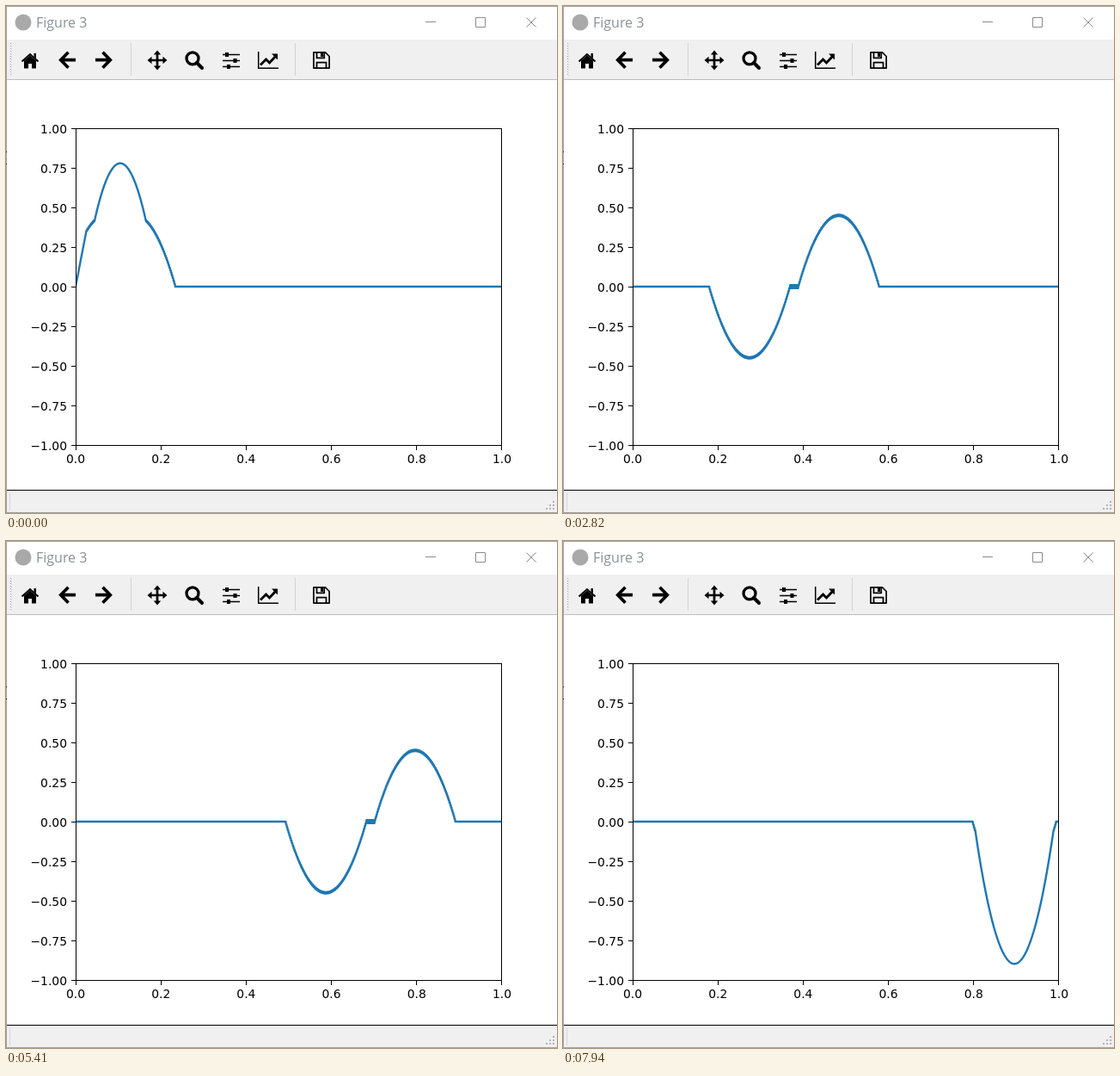
Write an HTML page that moves like this. It is 641 px wide and 589 px high and loops after 8000 ms.

```html
<!DOCTYPE html>
<html lang="en">
<head>
<meta charset="utf-8">
<title>Figure 3</title>
<style>
  html, body { margin: 0; width: 100%; height: 100%; overflow: hidden; background: #fff; }
  svg { display: block; width: 641px; height: 589px; }
  .title { font: 16px "Open Sans", sans-serif; fill: #8a9199; }
  .label { font: 13.89px "DejaVu Sans", sans-serif; fill: #000; }
  .line { fill: none; stroke: #000; }
  .crisp { shape-rendering: crispEdges; }
</style>
</head>
<body>
<svg viewBox="0 0 641 589">
  <defs><clipPath id="plot"><rect x="81" y="142" width="496" height="369"/></clipPath></defs>
  <rect width="641" height="589" fill="#fff"/>

  <!-- Title bar -->
  <circle cx="20" cy="19" r="9.5" fill="#a9a9a9"/>
  <text class="title" x="35" y="25">Figure 3</text>
  <g fill="none" stroke="#8c8c8c">
    <path d="M488 18.5H500M546.5 13.5H557.5V24.5H546.5Z"/>
    <path d="M605.5 13.5L616.5 24.5M616.5 13.5L605.5 24.5"/>
  </g>

  <!-- Toolbar -->
  <g class="crisp">
    <rect y="39" width="641" height="46" fill="#f0f0f0"/>
    <rect y="85" width="641" height="1" fill="#bdbdbd"/>
    <path d="M5.5 43V82" stroke="#a8a8a8" stroke-dasharray="1 2"/>
    <path d="M6.5 44V83" stroke="#d8d8d8" stroke-dasharray="1 2"/>
    <path d="M145.5 43V81M336.5 43V81" stroke="#d2d2d2"/>
  </g>
  <g id="home">
    <path d="M28 57.5L21 63.5V72.5H26V67H30V72.5H35V63.5Z"/>
    <path class="line" stroke-width="2" d="M18.5 64.5L28 56L37.5 64.5"/>
    <path d="M32.5 55H35V61L32.5 59Z"/>
  </g>
  <g class="line" stroke-width="3.7">
    <path d="M81 62.7H64.5M72.5 53.7L63.7 62.7L72.5 71.7"/>
    <path d="M104 62.7H120.5M112.5 53.7L121.3 62.7L112.5 71.7"/>
  </g>
  <path class="line" stroke-width="2.7" d="M176 55V71M168 63H184"/>
  <path d="M176 51.5L180.2 56.5H171.8ZM176 74.5L180.2 69.5H171.8ZM164.5 63L169.5 58.8V67.2ZM187.5 63L182.5 58.8V67.2Z"/>
  <circle class="line" cx="217" cy="60.8" r="7" stroke-width="3.3"/>
  <path class="line" d="M222 66L228 72" stroke-width="4" stroke-linecap="round"/>
  <path class="line" stroke-width="1.7" d="M252 56.5H272M252 63.5H272M252 70.5H272"/>
  <path d="M255 54H259V59H255ZM264.5 61H268.5V66H264.5ZM257 68H261V73H257Z"/>
  <path class="line" stroke-width="1.5" d="M293.7 53V72.3H317"/>
  <path class="line" stroke-width="2.9" d="M296 68.5L302.5 62L306.5 66L313.5 58.5"/>
  <path d="M309 55.5H316V62.5Z"/>
  <path class="line" stroke-width="1.7" stroke-linejoin="round" d="M357.9 53.9H371.5L376.1 58.5V72.1H357.9ZM361.5 72V65.6H372.5V72M361.5 54V60.4H370.2V54"/>
  <path d="M366 54H369V59H366Z"/>

  <!-- Plot -->
  <g clip-path="url(#plot)">
    <path id="wave" fill="none" stroke="#1f77b4" stroke-width="2.4" stroke-linejoin="round"/>
  </g>
  <path class="line crisp" d="M81.5 142.5H576.5V510.5H81.5Z"/>
  <g id="ticks"></g>

  <!-- Status bar and window edge -->
  <g class="crisp">
    <rect y="562" width="641" height="1" fill="#000"/>
    <rect y="563" width="641" height="26" fill="#f0f0f0"/>
    <path d="M4.5 566V586" stroke="#d5d5d5"/>
    <path d="M636 575h2v2h-2zM632 579h2v2h-2zM636 579h2v2h-2zM628 583h2v2h-2zM632 583h2v2h-2zM636 583h2v2h-2z" fill="#b4b4b4"/>
    <path d="M0 .5H641M.5 0V589M0 588.5H641" stroke="#a3a3a3"/>
    <path d="M0 169.5H1M0 183.5H1" stroke="#222"/>
  </g>
</svg>
<script>
const LOOP = 8000;
const CELLS = 1023, EDGE_LEFT = 10, EDGE_RIGHT = 204;
const FIRST_STEP = 36, STEPS_PER_POSE = 8, POSES = 124;
const GROUP = 13;
const groups = [[50, 810], [860, 1640], [1710, 2490], [2560, 3340], [3410, 4180],
  [4250, 5010], [5080, 5860], [5930, 6710], [6780, 7560], [7630, 8374]];

const px = x => 81 + 496 * x;
const py = y => 326 - 184 * y;

function add(parent, tag, attrs, text = '') {
  const node = document.createElementNS('http://www.w3.org/2000/svg', tag);
  for (const key in attrs) node.setAttribute(key, attrs[key]);
  node.textContent = text;
  parent.append(node);
}

function drawTicks() {
  const ticks = document.getElementById('ticks');
  for (let i = 0; i <= 8; i++) {
    const value = 1 - i / 4, y = 142.5 + 46 * i;
    add(ticks, 'path', { class: 'line crisp', d: `M76 ${y}H81` });
    add(ticks, 'text', { class: 'label', x: 71, y: y + 5.5, 'text-anchor': 'end' },
      value.toFixed(2).replace('-', '\u2212'));
  }
  for (let i = 0; i <= 5; i++) {
    const x = px(i / 5);
    add(ticks, 'path', { class: 'line crisp', d: `M${Math.min(576.5, Math.floor(x) + .5)} 511V516` });
    add(ticks, 'text', { class: 'label', x, y: 531, 'text-anchor': 'middle' }, (i / 5).toFixed(1));
  }
}

const toPath = u => 'M' + Array.from(u, (v, i) =>
  px(i / CELLS).toFixed(2) + ' ' + py(v).toFixed(2)).join('L');

// Leapfrog wave equation at unit Courant number, fixed ends, released from rest.
function solveWave() {
  const bump = i => Math.max(0, 100 * (i - EDGE_LEFT) * (EDGE_RIGHT - i) / CELLS ** 2);
  let before = Float64Array.from({ length: CELLS + 1 }, (_, i) => bump(i));
  let now = before.slice();
  const paths = [];
  for (let step = 1; paths.length < POSES; step++) {
    if (step >= FIRST_STEP && (step - FIRST_STEP) % STEPS_PER_POSE === 0) paths.push(toPath(now));
    const next = new Float64Array(CELLS + 1);
    for (let i = 1; i < CELLS; i++) next[i] = now[i - 1] + now[i + 1] - before[i];
    [before, now] = [now, next];
  }
  return paths;
}

function poseAt(time) {
  const t = time + 8;
  const g = groups.findLastIndex(([start]) => t >= start);
  if (g < 0) return 0;
  const [start, last] = groups[g];
  const within = Math.floor((t - start) / (last - start) * (GROUP - 1));
  return Math.min(1 + g * GROUP + Math.min(within, GROUP - 1), POSES - 1);
}

drawTicks();
const poses = solveWave();
const wave = document.getElementById('wave');
const origin = performance.now();
let shown = -1;

function render() {
  const pose = poseAt(Math.max(0, performance.now() - origin) % LOOP);
  if (pose !== shown) wave.setAttribute('d', poses[shown = pose]);
  requestAnimationFrame(render);
}
render();
</script>
</body>
</html>
```
